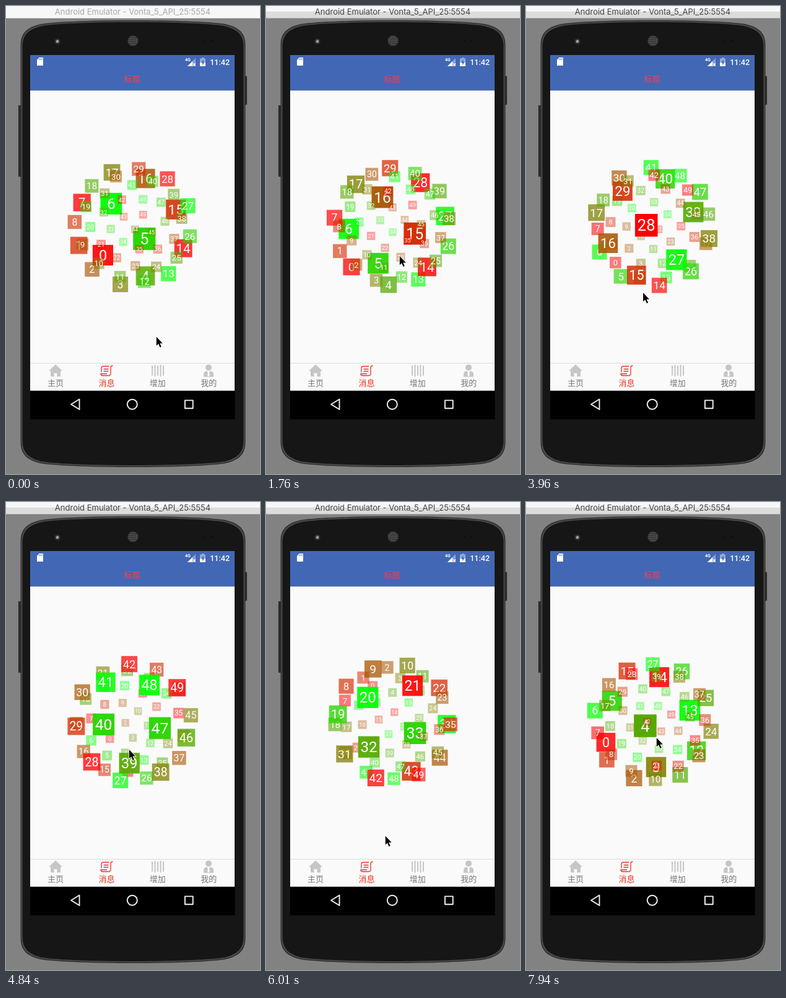
An HTML page with a canvas that plays this animation: 410 px wide and 754 px high, repeating every 8000 ms.

```html
<!DOCTYPE html>
<html lang="zh">
<head>
<meta charset="utf-8">
<title>Tag cloud</title>
<style>
  html, body { margin: 0; width: 100%; height: 100%; overflow: hidden; background: #828282; }
  canvas { display: block; width: 410px; height: 754px; }
</style>
</head>
<body>
<canvas id="stage" width="410" height="754"></canvas>
<script>
const ctx = document.getElementById('stage').getContext('2d');
const LOOP = 8000, TICK = 146.5, LAST_TICK = 54;
const COUNT = 50, CX = 204.5, CY = 355.5, RADIUS = 82.5;
const TAG_SIZE = 18.33, TAG_FONT = 12.83;
const CJK = '"Noto Sans CJK SC", "Noto Sans CJK", sans-serif';

// ---- sphere -------------------------------------------------------------
// Tags lie on a spiral from pole to pole, coloured red to green in sevens.
const tags = Array.from({ length: COUNT }, (_, i) => {
  const z = -1 + (2 * i + 1) / COUNT;
  const phi = Math.acos(z), theta = Math.sqrt(COUNT * Math.PI) * phi;
  const mix = (i % 7) / 6;
  return {
    dir: [Math.cos(theta) * Math.sin(phi), Math.sin(theta) * Math.sin(phi), z],
    rgb: [Math.round(255 * (1 - mix)), Math.round(255 * mix), 0]
  };
});

const dot = (a, b) => a.reduce((sum, v, i) => sum + v * b[i], 0);
const cross = (a, b) => [
  a[1] * b[2] - a[2] * b[1],
  a[2] * b[0] - a[0] * b[2],
  a[0] * b[1] - a[1] * b[0]
];

// Turns v about the axis of spin by its length in degrees, times amount.
function turn(v, spin, amount) {
  const degrees = Math.hypot(...spin), axis = spin.map(n => n / degrees);
  const angle = degrees * amount * Math.PI / 180;
  const c = Math.cos(angle), s = Math.sin(angle);
  const side = cross(axis, v), along = dot(axis, v) * (1 - c);
  return v.map((n, i) => n * c + side[i] * s + axis[i] * along);
}

// Steady spins about screen axes: a slow drift, then flicks that keep rolling.
const START = [26.8, 26.8, 0];
const spins = [
  { from: 0, to: 12, by: [16.2, 16.2, 0] },
  { from: 12, to: 21, by: [9.6, 6.2, 0] },
  { from: 21, to: 24, by: [4, 4, 0] },
  { from: 24, to: 33, by: [52.6, 42.7, 7.5] },
  { from: 33, to: 41, by: [102.2, 11.8, 0] },
  { from: 41, to: 47, by: [62.2, 6, 0] },
  { from: 47, to: LAST_TICK, by: [68.7, 5.9, 0] }
];

function orient(dir, at) {
  return spins.filter(s => s.from < at).reduce(
    (v, s) => turn(v, s.by, Math.min(1, (at - s.from) / (s.to - s.from))),
    turn(dir, START, 1));
}

// ---- drawing helpers ----------------------------------------------------
function rect(x, y, w, h, fill) {
  ctx.fillStyle = fill;
  ctx.fillRect(x, y, w, h);
}
function disc(x, y, r, fill) {
  ctx.fillStyle = fill;
  ctx.beginPath();
  ctx.arc(x, y, r, 0, 2 * Math.PI);
  ctx.fill();
}
function fillPath(d, fill) {
  ctx.fillStyle = fill;
  ctx.fill(new Path2D(d));
}
function strokePath(d, color, width) {
  ctx.strokeStyle = color;
  ctx.lineWidth = width;
  ctx.stroke(new Path2D(d));
}
function label(text, x, y, font, fill) {
  ctx.font = font;
  ctx.fillStyle = fill;
  ctx.textAlign = 'center';
  ctx.fillText(text, x, y);
}

// ---- static parts -------------------------------------------------------
function drawWindow(active) {
  rect(0, 0, 410, 754, '#828282');
  rect(0, 0, 410, 20, '#f7f7f7');
  if (active) rect(0, 9, 410, 11, '#dcdcdc');
  rect(0, 19, 410, 1, active ? '#b8b8b8' : '#dadada');
  label('Android Emulator - Vonta_5_API_25:5554', 204.5, 14,
    '13px Inter, sans-serif', active ? '#454545' : '#a9a9a9');
}

// Half width and half height are 182 and 362 around the centre.
const BODY = 'M-182-320C-182-340-171-349-149-354C-95-362 95-362 149-354C171-349 182-340 182-320' +
  'V320C182 341 171 350 149 355C95 363-95 363-149 355C-171 350-182 341-182 320Z';

function drawBody(inset, fill) {
  ctx.save();
  ctx.translate(205, 382.5);
  ctx.scale(1 - inset / 182, 1 - inset / 362);
  fillPath(BODY, fill);
  ctx.restore();
}

function drawPhone() {
  rect(20, 160, 5, 115, '#2b2b2b');
  rect(385, 113, 4, 46, '#2b2b2b');
  drawBody(0.5, '#333');
  drawBody(2, '#4c4c4c');
  drawBody(3.5, '#161616');

  disc(83, 57, 4.5, '#36363a');
  disc(83, 57, 2.2, '#a4a5b0');
  disc(205, 56, 9, '#303030');
  for (let y = -6; y <= 6; y += 3)
    for (let x = -6; x <= 6; x += 3)
      if (x * x + y * y < 60) disc(205 + x, 56 + y, 0.9, '#6a6a6a');
  disc(321, 57, 1.3, '#0b0b0b');
  disc(332, 56, 1.3, '#0b0b0b');
}

function drawStatusBar() {
  const blue = '#4267b5';
  rect(39, 79, 330, 57, blue);
  fillPath('M53.5 83H59Q60 83 60 84V95Q60 96 59 96H51Q50 96 50 95V87Z', '#fff');
  for (let x = 53.2; x < 58; x += 2.2) rect(x, 84.4, 1, 2.4, blue);

  label('4G', 293.5, 89, 'bold 7px Roboto, sans-serif', '#fff');
  fillPath('M306 84V97H293Z', 'rgba(255,255,255,.4)');
  fillPath('M301 89V97H293Z', '#fff');
  strokePath('M302 92.5L306 96.5M306 92.5L302 96.5', '#fff', 1.2);

  fillPath('M316 83H319.5V84.5H322V97H313V84.5H316Z', 'rgba(255,255,255,.45)');
  rect(313, 91, 9, 6, '#fff');
  fillPath('M318.6 86L315 91.6H317.2V95.5L320.4 90H318.6Z', blue);
  label('11:42', 345.2, 95, '500 12.6px Roboto, sans-serif', '#fff');

  label('标题', 203.5, 121.5, '13px ' + CJK, '#fb3d50');
}

function drawTabs() {
  const grey = '#c6c6c6', red = '#e8331f';
  rect(39, 575, 330, 1, '#dcdcdc');
  ['主页', '消息', '增加', '我的'].forEach((text, i) =>
    label(text, 80 + 82.4 * i, 611.5, '13px ' + CJK, i === 1 ? red : '#777'));

  fillPath('M80 577.5L91 588H88V597H82.5V591.5H77.5V597H72V588H69Z', grey);

  strokePath('M172.5 579.5Q169 579.5 169 583V592Q169 595.5 165.5 595.5H156Q153 595.5 153 592.5H163' +
    'M166 580.5H157Q154 580.5 154 583.5V590', red, 1.3);
  strokePath('M157.5 585H165.5M157.5 588.5H165.5', red, 1.3);

  for (let i = 0; i < 5; i++) {
    const h = i % 2 ? 19 : 16;
    rect(235 + 4.5 * i, 587.5 - h / 2, 2, h, grey);
  }

  disc(327, 582.5, 5, grey);
  fillPath('M319 597.5V593Q319 589 324 588L327 592L330 588Q335 589 335 593V597.5Z', grey);
  fillPath('M326 590H328L328.8 595L327 597L325.2 595Z', '#fafafa');
}

function drawNav() {
  rect(39, 619, 330, 1, '#c9c9c9');
  rect(39, 620, 330.5, 46, '#000');
  ctx.lineJoin = 'round';
  strokePath('M118.5 633.5V650L105 641.7Z', '#f2f2f2', 1.9);
  strokePath('M211.8 641.7A8 8 0 1 1 195.8 641.7A8 8 0 1 1 211.8 641.7Z', '#f2f2f2', 1.9);
  strokePath('M288.9 635.4H301.7V648.2H288.9Z', '#f2f2f2', 1.9);
  ctx.lineJoin = 'miter';
}

// ---- moving parts -------------------------------------------------------
function drawTags(at) {
  tags.forEach((tag, i) => {
    const [x, y, z] = orient(tag.dir, at);
    const scale = 2 / (2 + z), size = TAG_SIZE * scale, font = TAG_FONT * scale;
    const px = CX + RADIUS * x * scale, py = CY + RADIUS * y * scale;
    rect(px - size / 2, py - size / 2, size, size, `rgba(${tag.rgb},${scale / 2})`);
    label(i, px, py + font * 0.36, `${font}px Roboto, sans-serif`, '#fff');
  });
}

const cursorStops = [
  { at: 0, x: 242, y: 532 },
  { at: 8, x: 215, y: 402 },
  { at: 12, x: 215, y: 402 },
  { at: 21, x: 178, y: 359 },
  { at: 28, x: 190, y: 478 },
  { at: 33, x: 198, y: 398 },
  { at: 39, x: 191, y: 541 },
  { at: 48, x: 195, y: 523 },
  { at: LAST_TICK, x: 210, y: 379 }
];

function drawCursor(at) {
  const next = Math.max(1, cursorStops.findIndex(s => s.at >= at));
  const a = cursorStops[next - 1], b = cursorStops[next];
  const p = (at - a.at) / (b.at - a.at);
  const arrow = 'M0.8 1V15.3L4.1 12.2L6.6 18L8.8 17L6.3 11.5H10.8Z';
  ctx.save();
  ctx.translate(a.x + (b.x - a.x) * p, a.y + (b.y - a.y) * p);
  strokePath(arrow, '#fff', 1.8);
  fillPath(arrow, '#000');
  ctx.restore();
}

function draw(at) {
  drawWindow(at >= 10);
  drawPhone();
  rect(39, 136, 330, 484, '#fafafa');
  drawStatusBar();
  rect(39, 136, 330, 1, '#d5d8e0');
  drawTabs();
  drawNav();
  drawTags(at);
  drawCursor(at);
}

let shown = -1;
function frame() {
  const at = Math.min(LAST_TICK, Math.floor(performance.now() % LOOP / TICK));
  if (at !== shown) draw(shown = at);
  requestAnimationFrame(frame);
}
frame();
</script>
</body>
</html>
```
